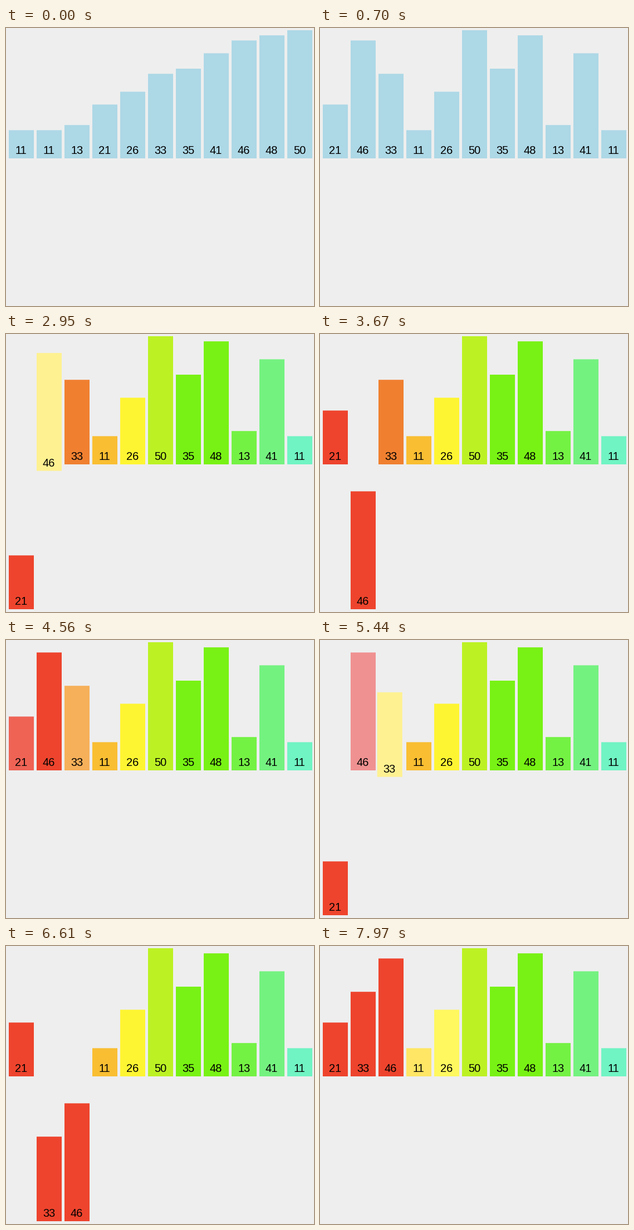
Recreate the animation shown at these times as a matplotlib script. Size 553 by 499 pixels, loop 8 s.

```python
import matplotlib.pyplot as plt
import numpy as np
from matplotlib.animation import FuncAnimation
from matplotlib.colors import to_rgb
from matplotlib.patches import Rectangle

W, H, DPI = 553, 499, 100
LOOP, TICK = 8000, 20
BAR_W, PITCH, LEFT = 45, 50, 5
BASE, DROP, UNIT = 234, 260, 4.6

SHUFFLED = [21, 46, 33, 11, 26, 50, 35, 48, 13, 41, 11]
ORDERED = sorted(SHUFFLED)
N = len(SHUFFLED)

BLUE = "#add8e6"
RED, PINK, YELLOW = "#ee442d", "#f09191", "#fff996"
RAINBOW = [RED, "#f25f32", "#f08030", "#f9be32", "#fef532", "#bcf224",
           "#78f214", "#78f214", "#74f244", "#74f280", "#70f4c4"]


def paint(**bars):
    return {int(k[1:]): {"color": c} for k, c in bars.items()}


def move(bar, slot, row):
    return {bar: {"slot": slot, "row": row, "color": RED}}


# start, end, visible steps, changes per bar
EVENTS = [
    (500, 700, 4, {i: {"value": v} for i, v in enumerate(SHUFFLED)}),
    (1540, 1650, 3, {i: {"color": c} for i, c in enumerate(RAINBOW)}),
    # merge 21 | 46
    (2010, 2130, 3, paint(b0=PINK, b1=YELLOW)),
    (2430, 2660, 5, move(0, 0, 1)),
    (2950, 3190, 5, move(1, 1, 1)),
    (3430, 3670, 5, move(0, 0, 0)),
    (3970, 4200, 5, move(1, 1, 0)),
    # merge 21 46 | 33
    (4500, 4620, 3, paint(b0=PINK, b2=YELLOW)),
    (4910, 5140, 5, {**move(0, 0, 1), **paint(b1=PINK)}),
    (5440, 5610, 4, move(2, 1, 1)),
    (5910, 6150, 5, move(1, 2, 1)),
    (6390, 6610, 5, move(0, 0, 0)),
    (6910, 7140, 5, move(2, 1, 0)),
    (7380, 7620, 5, move(1, 2, 0)),
    # next pair lights up
    (7970, 7970, 1, paint(b3="#ffe664", b4="#fff85f")),
]


def ease(u):
    return 4 * u**3 if u < 0.5 else 1 - 4 * (1 - u)**3


def progress(t, start, end, steps):
    if t >= end:
        return 1.0
    step = int((t - start) / (end - start) * (steps - 1) + 1e-6)
    return ease(min(1, 0.224 + 0.24 * step))


def blend(a, b, p):
    return a + (np.asarray(b) - a) * p


def state_at(t):
    bars = [{"slot": i, "row": 0, "value": v, "label": v,
             "color": np.array(to_rgb(BLUE))} for i, v in enumerate(ORDERED)]
    for start, end, steps, changes in EVENTS:
        if t < start:
            break
        p = progress(t, start, end, steps)
        for i, change in changes.items():
            for key, goal in change.items():
                if key == "color":
                    goal = to_rgb(goal)
                elif key == "value":
                    bars[i]["label"] = goal
                bars[i][key] = blend(bars[i][key], goal, p)
    return bars


fig = plt.figure(figsize=(W / DPI, H / DPI), dpi=DPI, facecolor="#eeeeee")
ax = fig.add_axes([0, 0, 1, 1])
ax.set_xlim(0, W)
ax.set_ylim(H, 0)
ax.axis("off")

rects, labels = [], []
for i in range(N):
    rect = Rectangle((0, 0), BAR_W, 1, linewidth=0, snap=False, zorder=2 + i)
    rects.append(ax.add_patch(rect))
    labels.append(ax.text(0, 0, "", family="Liberation Sans", color="black",
                          fontsize=20 * 72 / DPI, ha="left", va="baseline",
                          zorder=2.5 + i))


def draw(n):
    for bar, rect, label in zip(state_at(n * TICK + TICK / 2), rects, labels):
        x = LEFT + PITCH * bar["slot"]
        bottom = BASE + DROP * bar["row"]
        height = UNIT * bar["value"]
        rect.set_xy((x, bottom - height))
        rect.set_height(height)
        rect.set_facecolor(bar["color"])
        label.set_position((x + 11, bottom - 8))
        label.set_text(str(bar["label"]))
    return rects + labels


def reset():
    return draw(0)


anim = FuncAnimation(fig, draw, frames=LOOP // TICK, init_func=reset,
                     interval=TICK, repeat=True, repeat_delay=0, blit=False)
plt.show()
```
